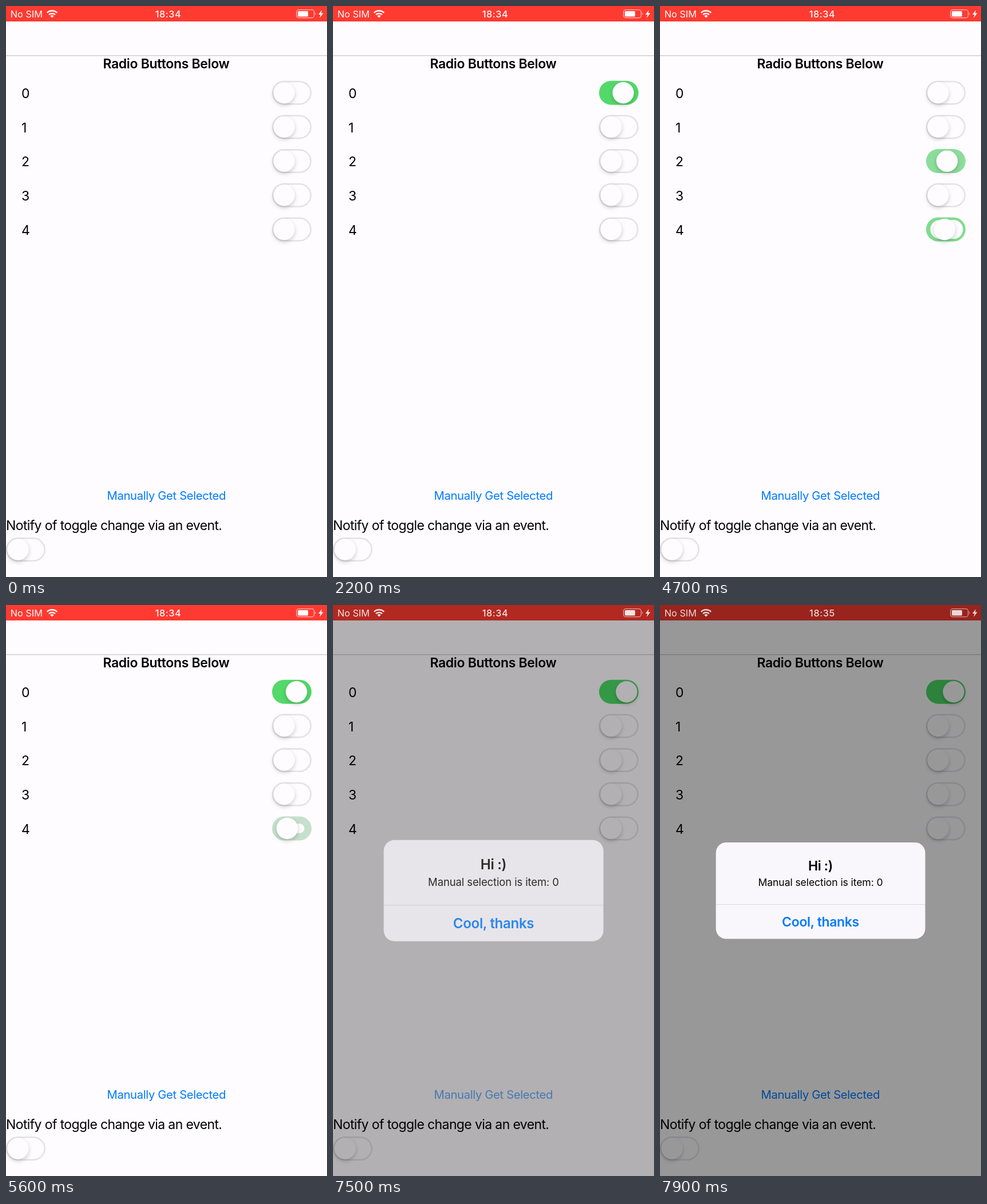
These frames come from a looping animation (561x998 px, 8 s). An HTML page:

```html
<!DOCTYPE html>
<html lang="en">
<head>
<meta charset="utf-8">
<title>Radio switches</title>
<style>
  html, body { margin: 0; width: 100%; height: 100%; overflow: hidden; background: #fefcff; }
  svg { display: block; width: 100vw; height: 100vh; }
  text { font-family: Inter, Roboto, sans-serif; font-size: 23px; letter-spacing: -.027em; }
  .semi { font-weight: 600; letter-spacing: -.015em; }
  .mid { text-anchor: middle; }
  .link { fill: #007aff; }
  .knob { fill: #fefcff; filter: drop-shadow(0 3.5px 3.5px rgba(0,0,0,.2)); }
  #manual { font-size: 20.3px; letter-spacing: -.018em; }
  #message { font-size: 17.6px; letter-spacing: -.006em; }
  #status text { font-size: 16.3px; letter-spacing: 0; fill: #fff; }
  #status #clock { font-weight: 500; letter-spacing: .035em; }
</style>
</head>
<body>
<svg id="stage" viewBox="0 0 561 998" preserveAspectRatio="none">
  <rect width="561" height="998" fill="#fefcff"/>
  <rect width="561" height="27" fill="#ff3a31"/>
  <rect y="86" width="561" height="1.4" fill="#cbc9cd"/>
  <text class="semi mid" x="280" y="109">Radio Buttons Below</text>
  <g id="rows"></g>
  <text id="manual" class="link mid" x="280.3" y="863">Manually Get Selected</text>
  <text x="0" y="916">Notify of toggle change via an event.</text>
  <rect id="dim" width="561" height="998"/>

  <g id="status">
    <text x="7.8" y="20">No SIM</text>
    <g fill="none" stroke="#fff" stroke-width="2.5">
      <path d="M71.8 11.8a12.3 12.3 0 0 1 17.4 0"/>
      <path d="M75 15.2a7.8 7.8 0 0 1 11 0"/>
    </g>
    <path d="M77.4 17.4a4.4 4.4 0 0 1 6.2 0l-3.1 3.2z" fill="#fff"/>
    <text id="clock" class="mid" x="283.5" y="20">18:34</text>
    <rect x="507.7" y="6.7" width="30.8" height="14" rx="4" fill="none" stroke="#fff" stroke-opacity=".65" stroke-width="1.3"/>
    <rect x="510" y="9" width="18" height="9.5" rx="1.5" fill="#fff"/>
    <path d="M540.2 11.3q2.4 2.4 0 4.8z" fill="#fff" fill-opacity=".7"/>
    <path d="M552 7l-6 8h3.6l-1.6 6 6.5-8.4h-3.7z" fill="#fff"/>
  </g>

  <g id="alert">
    <rect x="97.7" y="415" width="365.8" height="168.5" rx="18" fill="#f9f7fb"/>
    <rect x="97.7" y="523" width="365.8" height="1" fill="#dad8dd"/>
    <text class="semi mid" x="280.5" y="464">Hi :)</text>
    <text id="message" class="mid" x="280.5" y="491">Manual selection is item: 0</text>
    <text class="semi link mid" x="280.5" y="562">Cool, thanks</text>
  </g>
</svg>
<script>
const LOOP = 8000, STEP = 100;
const GREY = [228, 226, 230], GREEN = [76, 217, 100];
const PRESS_AT = 7300, ALERT_AT = 7380, MINUTE_AT = 7900;

// lead: how far the slide has already run when it first shows
const taps = [
  { at: 2200, lead: 180, on: 0 },
  { at: 3800, lead: 94, on: 2, off: 0 },
  { at: 4700, lead: 90, on: 4, off: 2 },
  { at: 5500, lead: 87, on: 0, off: 4 }
];

const byId = id => document.getElementById(id);
const clamp = v => Math.max(0, Math.min(1, v));
const smooth = v => v * v * (3 - 2 * v);
const mix = (a, b, k) => `rgb(${a.map((v, i) => Math.round(v + (b[i] - v) * k))})`;
const spring = x => x <= 0 ? 0 : 1 - (1 + x) * Math.exp(-x);

function add(parent, tag, attrs) {
  const el = document.createElementNS("http://www.w3.org/2000/svg", tag);
  for (const name in attrs) el.setAttribute(name, attrs[name]);
  return parent.appendChild(el);
}

function makeSwitch(x, cy) {
  const g = add(byId("rows"), "g", { transform: `translate(${x} ${cy})` });
  return {
    track: add(g, "rect", { y: -21, width: 69, height: 42, rx: 21 }),
    hole: add(g, "rect", { x: -31.9, y: -18.4, width: 63.8, height: 36.8, rx: 18.4, fill: "#fefcff" }),
    knob: add(g, "circle", { class: "knob", r: 18.7 })
  };
}

function drawSwitch(sw, p, turningOn) {
  const green = turningOn ? 1 - (1 - p) ** 2 : 1 - p;
  const hole = turningOn ? 1 - p ** 2.6 : p ** 3.6;
  sw.track.setAttribute("fill", mix(GREY, GREEN, green));
  sw.hole.setAttribute("transform", `translate(${34.5 + 14 * (1 - hole)} 0) scale(${hole})`);
  sw.knob.setAttribute("cx", 21 + 27 * (turningOn ? p : 1 - p));
}

const switches = [0, 1, 2, 3, 4].map(i => {
  const cy = 151.7 + 59.7 * i;
  add(byId("rows"), "text", { x: 27, y: cy + 9.3 }).textContent = i;
  return makeSwitch(465, cy);
});
drawSwitch(makeSwitch(0, 950), 0, true);

function draw(t) {
  switches.forEach((sw, i) => {
    const tap = taps.filter(e => t >= e.at && (e.on === i || e.off === i)).pop();
    if (tap) drawSwitch(sw, spring((t - tap.at + tap.lead) * .016), tap.on === i);
    else drawSwitch(sw, 0, true);
  });

  const pressed = t >= PRESS_AT;
  byId("manual").setAttribute("opacity", pressed ? .2 + .8 * smooth(clamp((t - PRESS_AT) / 400)) : 1);

  const shown = spring((t - ALERT_AT) * .0225);
  const scale = 1.2 - .2 * shown;
  byId("dim").setAttribute("opacity", .4 * shown);
  byId("status").setAttribute("opacity", 1 - .18 * shown);
  byId("alert").setAttribute("opacity", shown);
  byId("alert").setAttribute("transform", `translate(280.5 499.2) scale(${scale}) translate(-280.5 -499.2)`);
  byId("clock").textContent = t >= MINUTE_AT ? "18:35" : "18:34";
}

const start = performance.now();
function tick() {
  const t = (performance.now() - start + 4) % LOOP;
  draw(Math.floor(t / STEP) * STEP);
  requestAnimationFrame(tick);
}
tick();
</script>
</body>
</html>
```
